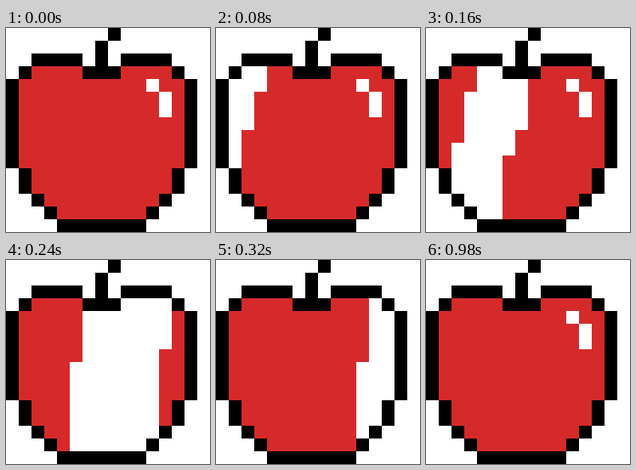
An HTML page that plays this animation: 256 by 256 pixels, repeating every 1360 ms.

```html
<!DOCTYPE html>
<html lang="en">
<head>
<meta charset="utf-8">
<title>Pixel apple</title>
<style>
  html, body { margin: 0; height: 100%; overflow: hidden; background: #fff; }
  svg { display: block; width: 100vw; height: 100vh; }
  .body { fill: #d62a2a; }
  .glint, .shine path { fill: #fff; }
  .glint { animation: glint 1360ms step-end infinite; }
  .shine path {
    opacity: 0;
    animation: flash 1360ms step-end calc(var(--step) * 80ms) infinite;
  }
  /* one step is 1/17 of the loop */
  @keyframes flash {
    0% { opacity: 1; }
    5.88235%, 100% { opacity: 0; }
  }
  @keyframes glint {
    0% { opacity: 1; }
    23.52941% { opacity: 0; }
    29.41176%, 100% { opacity: 1; }
  }
</style>
</head>
<body>
<!-- one unit is one pixel-art cell -->
<svg viewBox="0 0 16 16" shape-rendering="crispEdges">
  <path class="body" d="M2 3H13V4H14V11H13V13H12V14H11V15H4V14H3V13H2V11H1V4H2z"/>
  <path class="glint" d="M11 4h1v1h1v2h-1v-2h-1z"/>
  <g class="shine">
    <path style="--step:1" d="M1 3H4V5H3V8H2V11H1z"/>
    <path style="--step:2" d="M4 3H8V8H7V10H6V15H2V9H3V5H4z"/>
    <path style="--step:3" d="M6 3H13V7H12V15H5V8H6z"/>
    <path style="--step:4" d="M12 3H14V15H11V8H12z"/>
  </g>
  <path class="outline" d="M8 0h1v1h-1z M7 1h1v2h-1z M2 2h4v1h-4z M9 2h4v1h-4z
    M1 3h1v1h-1z M6 3h3v1h-3z M13 3h1v1h-1z M0 4h1v7h-1z M14 4h1v7h-1z
    M1 11h1v2h-1z M13 11h1v2h-1z M2 13h1v1h-1z M12 13h1v1h-1z
    M3 14h1v1h-1z M11 14h1v1h-1z M4 15h7v1h-7z"/>
</svg>
</body>
</html>
```
